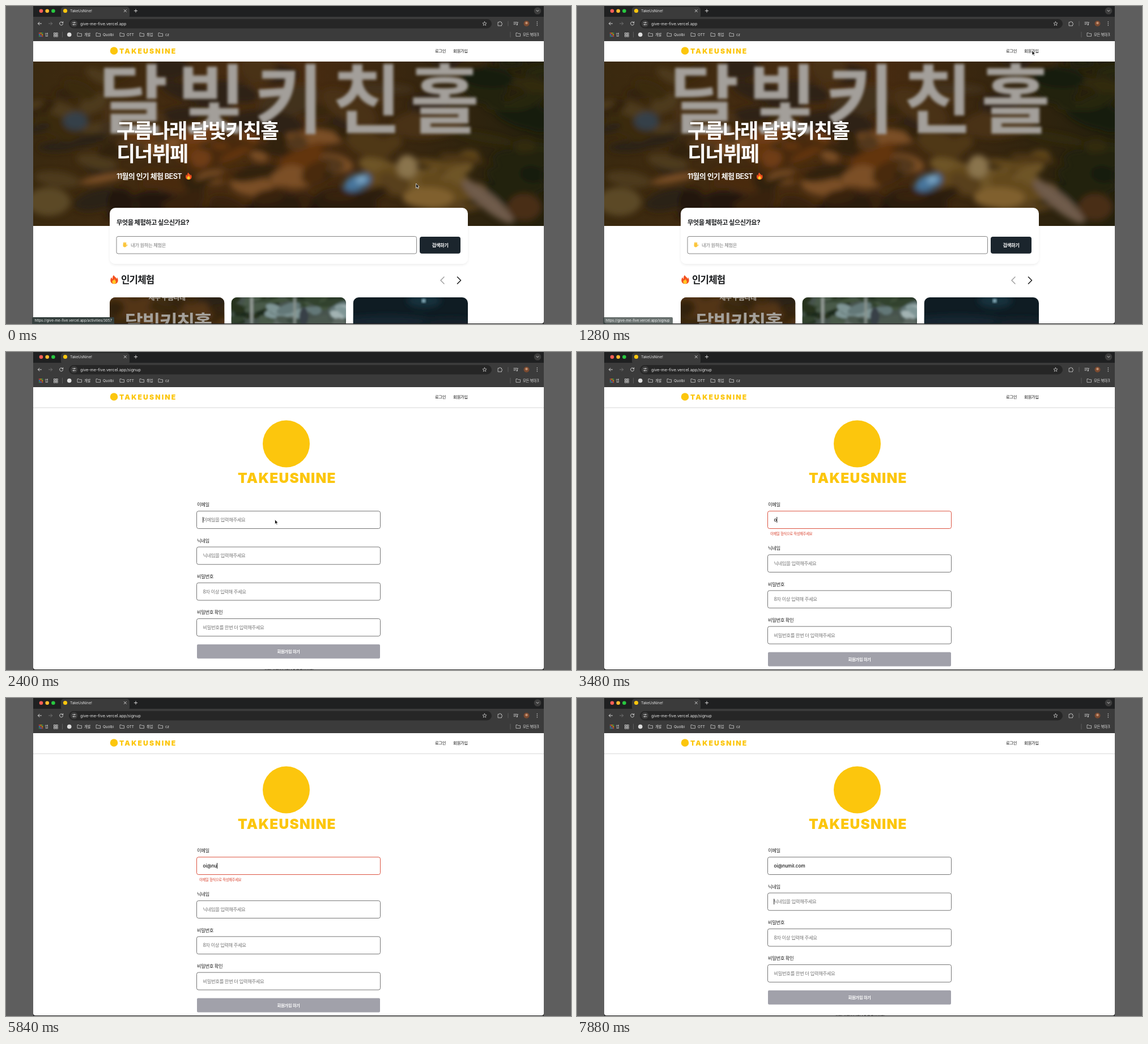
These frames come from a looping animation (997 by 561 pixels, 8 s). An HTML page:

```html
<!DOCTYPE html>
<html lang="ko">
<head>
<meta charset="utf-8">
<style>
  html, body { margin: 0; height: 100%; overflow: hidden; background: #5e5e5e; }
  svg { position: fixed; inset: 0; width: 100%; height: 100%; }
  text { font-family: Inter, 'Noto Sans CJK KR', 'Noto Sans CJK JP', 'Noto Sans CJK', sans-serif; white-space: pre; }
</style>
</head>
<body>
<svg id="stage" viewBox="0 0 997 561"></svg>
<script>
const LOOP = 8000, YELLOW = '#fcc60d', DARK = '#1b1d1f';
const SITE = 'give-me-five.vercel.app';
const BRAND = 'TakeUsNine', PLACE = '구름나래', DINING = '달빛키친홀';

let seed = 7;
const rnd = () => (seed = seed * 16807 % 2147483647) / 2147483647;

// ---- drawing helpers; cy is the middle of the line ----
const text = (x, cy, size, str, fill = DARK, weight = 400, more = '') => {
  const gap = /[가-힣]/.test(str) ? -.05 * size : 0;
  return `<text x="${x}" y="${cy + size * .36}" font-size="${size}" fill="${fill}" font-weight="${weight}" letter-spacing="${gap}" ${more}>${str}</text>`;
};
const mid = 'text-anchor="middle"';
const rect = (x, y, w, h, fill, r = 0, more = '') =>
  `<rect x="${x}" y="${y}" width="${w}" height="${h}" rx="${r}" fill="${fill}" ${more}/>`;
const dot = (x, y, r, fill) => `<circle cx="${x}" cy="${y}" r="${r}" fill="${fill}"/>`;
const blob = (x, y, rx, ry, fill, turn = 0) =>
  `<ellipse cx="${x}" cy="${y}" rx="${rx}" ry="${ry}" fill="${fill}" transform="rotate(${turn} ${x} ${y})"/>`;
const line = (d, color, w = 1, more = '') =>
  `<path d="${d}" fill="none" stroke="${color}" stroke-width="${w}" stroke-linecap="round" stroke-linejoin="round" ${more}/>`;
const wordmark = (x, y, size, gap) =>
  `<text x="${x}" y="${y}" font-size="${size}" font-weight="900" fill="${YELLOW}" letter-spacing="${gap}">${BRAND.toUpperCase()}</text>`;
const flame = (x, y, s) => `<g transform="translate(${x} ${y}) scale(${s})">
  <path d="M-1-8C1-4 4-4 4-1 5-2 5-3 5-4 8 0 8 8 0 8-8 8-8 0-5-4-4-2-4-1-3-1-3-4-3-6-1-8Z" fill="#f4511e"/>
  <path d="M0-1C3 2 5 7 0 8-5 7-4 3-2 1-1 2 0 1 0-1Z" fill="#ffc928"/></g>`;

// Random blurred patches inside a box
const scatter = (x, y, w, h, n, size, colors) => Array.from({ length: n }, () =>
  blob(x + rnd() * w, y + rnd() * h, size * (.5 + rnd()), size * (.2 + rnd() * .4),
    colors[Math.floor(rnd() * colors.length)], rnd() * 60 - 30)).join('');

// ---- browser window ----
const folder = (x, y = 50.5) =>
  line(`M${x} ${y + 2.5}v-5.5h2.6l1 1.2h3.9v4.3z`, '#ccc', .8);
const light = '#e3e3e3', grey = '#c4c4c4';

const chrome = () => rect(48, 0, 901, 62, '#3b3b3b') + rect(48, 0, 901, 19, '#1f2021') +
  rect(97, 1.5, 121, 20, '#3b3b3b', 5) +
  ['#fe5f57', '#febc2e', '#28c840'].map((c, i) => dot(62 + i * 10.7, 8.7, 3.3, c)).join('') +
  dot(104.5, 8.5, 3.6, YELLOW) + text(113, 8.3, 6.5, BRAND + '!', light) +
  line('M208.3 6.5l4 4m0-4l-4 4M226.3 8.5h5.4m-2.7-2.7v5.4', light, .9) +
  dot(938, 8.5, 6.3, '#3d3d3d') + line('M936 7.5l2 2 2-2', light, .9) +
  line('M62.5 31h-6m2.5-2.6l-2.6 2.6 2.6 2.6', light, .9) +
  line('M75.5 31h6m-2.5-2.6l2.6 2.6-2.6 2.6', '#777', .9) +
  line('M100.3 29.5a3 3 0 1 0 .3 2M100.7 27.7v2h-2', light, .9) +
  rect(111, 23, 746, 16.5, '#262626', 8.2) + dot(120, 31, 6.3, '#3b3b3b') +
  line('M117.5 29.2h2m2 0h1.5M117.5 32.8h1.2m2 0h2.3', light, .8) +
  line('M120.6 28.4v1.6M119.6 32v1.6', light, 1) +
  `<g id="url"></g>` +
  line('M844.5 27.5l1 2.4 2.6.2-2 1.7.6 2.5-2.2-1.4-2.2 1.4.6-2.5-2-1.7 2.6-.2z', grey, .8) +
  line('M868.5 28.5h2a1.2 1.2 0 0 1 2.4 0h1.6v2a1.2 1.2 0 0 1 0 2.4v2h-6z', grey, .9) +
  line('M886 27v8', '#666', .8) +
  line('M896 28.5h6m-6 2h5m-5 2h3M902.5 33v-4h1.3', grey, .8) + dot(901.6, 33, 1.1, grey) +
  dot(918.5, 31, 5, '#7b4a30') + dot(918.5, 30, 2.2, '#c28f70') +
  [28, 31, 34].map(y => dot(937.3, y, .7, light)).join('') +
  [0, 1, 2, 3, 4, 5, 6, 7, 8].map(i => rect(58 + i % 3 * 2.7, 47 + Math.floor(i / 3) * 2.7, 1.8, 1.8,
    ['#ea4335', '#fbbc04', '#34a853', '#4285f4'][i % 4])).join('') +
  text(68.5, 50.5, 6.3, '앱', light) +
  [0, 1, 2, 3].map(i => rect(84.5 + i % 2 * 4, 47.5 + (i >> 1) * 4, 2.6, 2.6, 'none', 0, 'stroke="#ddd" stroke-width=".8"')).join('') +
  line('M99.5 46v9M890 46v9', '#666', .8) + dot(111.7, 50.5, 3.8, '#ddd') +
  [[126, '개발'], [159, 'Quolbi'], [201, 'OTT'], [236, '취업'], [269, 'cz']].map(([x, s]) =>
    folder(x) + text(x + 12, 50.5, 6.3, s, light)).join('') +
  folder(900) + text(912, 50.5, 6.3, '모든 북마크', light);

const header = () => rect(48, 62, 901, 36.5, '#fff') + dot(190.5, 79, 6.8, YELLOW) +
  wordmark(200, 83.6, 12.2, 2.1) +
  text(757, 79.7, 7.3, '로그인', '#111', 500) + text(789, 79.7, 7.4, '회원가입', '#111', 500);

// ---- landing page ----
const hero = () => `<g clip-path="url(#heroBox)">${rect(48, 98, 901, 290, 'url(#heroTone)')}
  <g filter="url(#soft)">
  ${scatter(48, 110, 130, 260, 20, 32, ['#3b2c10', '#33240f', '#4d3b1e', '#2b2114'])}
  ${scatter(180, 100, 640, 125, 26, 44, ['#38270f', '#42301a', '#2f2412', '#4a3216'])}
  ${scatter(170, 225, 430, 95, 46, 30, ['#64350f', '#703c17', '#4a2a10', '#52391a', '#7c5026', '#33230f'])}
  ${scatter(180, 330, 430, 55, 22, 44, ['#21180c', '#2b1e10', '#382410'])}
  ${scatter(840, 100, 110, 240, 22, 38, ['#20200d', '#28250c', '#191b0a', '#332a10'])}
  ${scatter(640, 240, 180, 120, 22, 36, ['#63491f', '#59411f', '#6e5428', '#4f3817'])}
  ${blob(123, 203, 22, 16, '#34404a')}${blob(75, 345, 38, 25, '#5c4828')}
  ${blob(620, 311, 25, 14, '#46759b', -22)}${blob(627, 306, 10, 6, '#7fa9c6', -22)}
  ${blob(640, 336, 32, 10, '#2b1b0d', -20)}${blob(708, 283, 18, 20, '#8a744d')}
  ${blob(745, 338, 45, 18, '#80602f')}${blob(850, 345, 58, 14, '#705b4b', 39)}${blob(915, 355, 30, 24, '#4a2f14')}
  </g>
  <g filter="url(#haze)">${text(507, 166, 133, DINING, '#a39f9a', 700, mid + ' style="letter-spacing:15px"')}</g></g>`;

const card = (x, fill, inside) => `<svg x="${x}" y="514" width="202.5" height="47">${rect(0, 0, 202.5, 80, fill, 10)}
  <g clip-path="url(#cardBox)">${inside}</g></svg>`;

const home = () => hero() +
  text(195, 220.5, 35.6, PLACE + ' ' + DINING, '#fff', 700) + text(195, 261.5, 36, '디너뷔페', '#fff', 700) +
  text(195, 300.5, 12.9, '11월의 인기 체험 BEST', '#fff', 600) + flame(322.3, 300, .78) +
  rect(183, 356, 632, 99, '#fff', 10, 'filter="url(#shade)"') +
  text(195, 381.5, 11.3, '무엇을 체험하고 싶으신가요?', DARK, 700) +
  rect(195, 406.5, 529.5, 30.5, '#fff', 3, 'stroke="#777" stroke-width=".9"') +
  rect(206.5, 418, 6, 7.5, '#fbc53b', 3) + line('M207.5 419v-1.5M209.5 418v-1.2M211.5 419v-1.5M213 423l1-1.5', '#fbc53b', 1.3) +
  text(220, 421.8, 8.4, '내가 원하는 체험은', '#777') +
  rect(730, 407, 72, 29.8, '#1b252d', 4) + text(766, 421.8, 8.4, '검색하기', '#fff', 700, mid) +
  flame(191, 482.5, .98) + text(203, 482.5, 16.8, '인기체험', DARK, 700) +
  line('M773 478l-6 6 6 6', '#999', 1.4) + line('M796.5 478l6 6-6 6', '#222', 1.6) +
  card(183, '#39270f',
    `<g filter="url(#soft)">${scatter(0, 0, 202, 47, 22, 26, ['#33240f', '#453015', '#523617', '#2a2012'])}</g>` +
    text(101, 1, 12, '제주 ' + PLACE, '#aaa59d', 700, mid) + text(103, 44, 35, DINING, '#a5a19b', 700, mid)) +
  card(397.5, '#46524c',
    `<g filter="url(#fine)">${scatter(0, 0, 75, 47, 24, 15, ['#26331f', '#33432f', '#1f2a1c', '#4a5a48'])}
     ${scatter(75, 0, 128, 14, 14, 18, ['#33432f', '#42543c', '#283527'])}
     ${scatter(75, 18, 128, 14, 16, 15, ['#7f9595', '#a3b3b3', '#647878'])}
     ${scatter(75, 40, 128, 10, 12, 20, ['#4b5850', '#3b4a40', '#5d6862'])}
     ${rect(34, 0, 4, 47, '#a3a9a5')}${rect(110, 0, 4, 47, '#8b9590')}${blob(128, 34, 8, 16, '#384046')}</g>`) +
  card(612.5, '#0f1c23',
    `<g filter="url(#soft)">${blob(125, 6, 30, 12, '#16303e')}${blob(60, 42, 80, 10, '#182730')}${blob(170, 44, 50, 8, '#15232a')}</g>
     <g filter="url(#fine)">${dot(124.5, 6, 3.6, '#9cc4d2')}</g>`);

// ---- sign-up page ----
const ROW = 63.25;
const fields = [
  ['이메일', '이메일을 입력해주세요'], ['닉네임', '닉네임을 입력해주세요'],
  ['비밀번호', '8자 이상 입력해 주세요'], ['비밀번호 확인', '비밀번호를 한번 더 입력해주세요']
];
const field = ([label, hint], i) => {
  const y = i * ROW;
  return text(337, 269.5 + y, 8.3, label, '#222', 500) +
    rect(336.5, 280.7 + y, 324, 30.8, '#fff', 3.2, `id="box${i}" stroke="#666" stroke-width=".9"`) +
    text(347.5, 296.2 + y, 8.4, hint, '#777', 400, `id="hint${i}"`);
};
const signup = () => line('M48 98.3H949', '#d8d8d8', 1) + dot(494.5, 162, 41.5, YELLOW) +
  wordmark(409, 231, 24.4, 1.3) + field(fields[0], 0) +
  text(347.5, 296.2, 8.1, '', '#111', 500, 'id="typed"') +
  `<g id="error">${text(341, 320.3, 6.3, '이메일 형식으로 작성해주세요', '#d9402c')}</g>
  <g id="rest">${fields.slice(1).map((f, i) => field(f, i + 1)).join('')}
  ${rect(337, 515.8, 323, 25, '#a1a1aa', 2)}${text(498.5, 528.3, 7.4, '회원가입 하기', '#fff', 600, mid)}
  ${text(499, 562, 7.1, '이미 회원이신가요? 로그인하기', '#333', 400, mid)}</g>
  <path id="caret" stroke="#000" stroke-width=".9"/>`;

const stage = document.getElementById('stage');
stage.innerHTML = `<defs>
  <linearGradient id="heroTone"><stop stop-color="#3a290f"/><stop offset=".5" stop-color="#4a2c11"/><stop offset="1" stop-color="#24200d"/></linearGradient>
  <clipPath id="heroBox">${rect(48, 98, 901, 290)}</clipPath>
  <clipPath id="cardBox">${rect(0, 0, 202.5, 80, '#000', 10)}</clipPath>
  <clipPath id="window"><path d="M48 0H949V556a4 4 0 0 1-4 4H52a4 4 0 0 1-4-4Z"/></clipPath>
  <filter id="soft"><feGaussianBlur stdDeviation="5.5"/></filter>
  <filter id="fine"><feGaussianBlur stdDeviation="2"/></filter>
  <filter id="haze"><feGaussianBlur stdDeviation="2.6"/></filter>
  <filter id="shade"><feDropShadow dx="0" dy="2" stdDeviation="2" flood-opacity=".07"/></filter></defs>
  ${rect(0, 0, 997, 561, '#5e5e5e')}${rect(48, 550, 901, 11, '#222')}
  <g clip-path="url(#window)">${rect(48, 0, 901, 561, '#fff')}${chrome()}${header()}
  <g id="home">${home()}</g><g id="signup">${signup()}</g></g>
  <g id="status"><rect x="46" y="549" height="14" rx="2" fill="#35403e"/>${text(50.5, 554.8, 6.2, '', '#eee')}</g>
  <path id="mouse" d="M0 0V8.2L1.9 6.5 3.2 9.3 4.5 8.7 3.2 6H5.6Z" fill="#111" stroke="#fff" stroke-width=".7"/>`;

const $ = id => document.getElementById(id);
const show = (el, on) => el.style.display = on ? '' : 'none';
const [statusBox, statusText] = $('status').children;

// ---- timeline ----
const NAV = 1320, FOCUS = 2240, NEXT = 7760;
const BAD = [3360, 7520];            // error message shown between these
const strokes = [
  [3360, 'o'], [4040, 'oi'], [5160, 'oi@'], [5480, 'oi@n'], [5720, 'oi@nu'], [5960, 'oi@num'],
  [6160, 'oi@numi'], [6360, 'oi@numil'], [6680, 'oi@numilc'], [6960, 'oi@numil'],
  [7120, 'oi@numil.'], [7320, 'oi@numil.c'], [7520, 'oi@numil.co'], [7600, 'oi@numil.com']
];
const path = [[520, 723.5, 313], [1240, 803, 78.5], [1440, 803, 78.5], [2160, 474.5, 295.5]];

function mouseAt(t) {
  if (t <= path[0][0]) return path[0].slice(1);
  for (let i = 1; i < path.length; i++) {
    const [t0, x0, y0] = path[i - 1], [t1, x1, y1] = path[i];
    if (t < t1) {
      const p = (t - t0) / (t1 - t0), e = p * p * (3 - 2 * p);
      return [x0 + (x1 - x0) * e, y0 + (y1 - y0) * e];
    }
  }
  return path[path.length - 1].slice(1);
}

function draw(t) {
  const landing = t < NAV, [mx, my] = mouseAt(t);
  show($('home'), landing);
  show($('signup'), !landing);
  $('url').innerHTML = text(131, 31.2, 7.2, SITE + (landing ? '' : '/signup'), light);
  $('mouse').setAttribute('transform', `translate(${mx} ${my})`);
  show($('mouse'), t < BAD[0]);

  const onHero = landing && my > 98, onLink = t >= 1200 && t < 1600;
  show($('status'), onHero || onLink);
  $('status').setAttribute('opacity', onLink ? Math.min(1, .2 + (t - 1200) / 150) : 1);
  statusText.textContent = `https://${SITE}/${onHero ? 'activities/3057' : 'signup'}`;
  statusBox.setAttribute('width', onHero ? 145 : 123);
  if (landing) return;

  let typed = '', last = FOCUS;
  for (const [at, str] of strokes) if (t >= at) [last, typed] = [at, str];
  $('typed').textContent = typed;
  show($('hint0'), !typed);

  const bad = t >= BAD[0] && t < BAD[1];
  show($('error'), bad);
  $('box0').setAttribute('stroke', bad ? '#d9402c' : '#666');
  $('rest').setAttribute('transform', `translate(0 ${bad ? 13.7 : 0})`);

  const next = t >= NEXT;
  if (next) last = NEXT;
  const x = 347.7 + (next || !typed ? 0 : $('typed').getComputedTextLength() + .2);
  $('caret').setAttribute('d', `M${x} ${next ? 354.2 : 291}v10`);
  show($('caret'), t >= FOCUS && (t - last) % 800 < 400 || t >= 4840 && t < 5160);
}

const start = performance.now();
function tick() {
  draw((performance.now() - start) % LOOP);
  requestAnimationFrame(tick);
}
tick();
</script>
</body>
</html>
```
